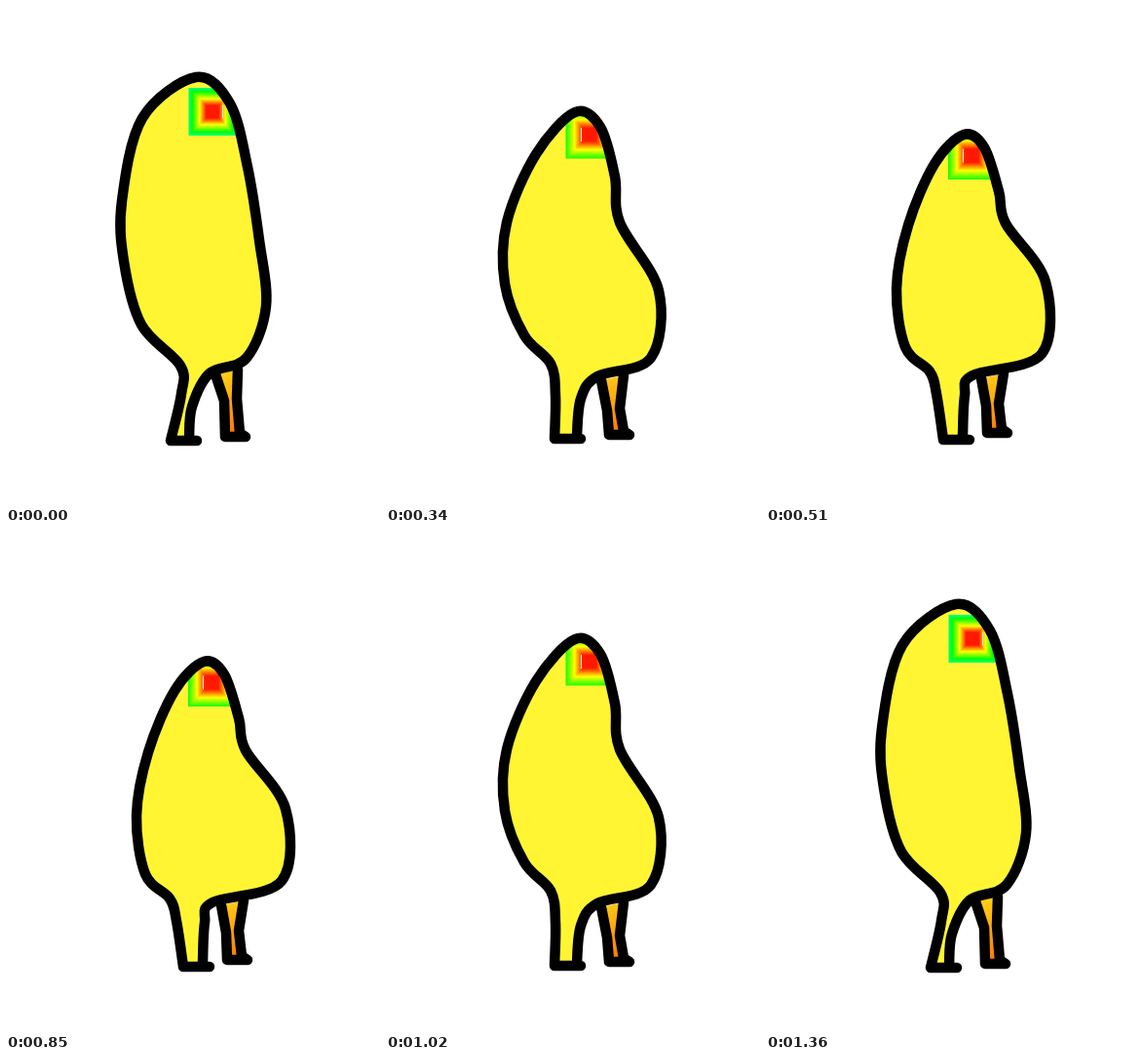
An HTML page with a canvas that plays this animation: 384 px wide and 512 px high, repeating every 1530 ms.

```html
<!DOCTYPE html>
<html lang="en">
<head>
<meta charset="utf-8">
<title>Squashing blob</title>
<style>
  html, body { margin: 0; width: 100%; height: 100%; overflow: hidden; background: #fff; }
  canvas { display: block; width: 100vw; height: 100vh; }
</style>
</head>
<body>
<canvas id="stage" width="384" height="512"></canvas>
<script>
const ctx = document.getElementById('stage').getContext('2d');
const STEP = 170, STEPS = 9;

// body: key points from the front heel, clockwise over the crown, to the front ankle
// leg: top, knee and heel of the back leg
// face: centre x, centre y, hue at the rim, side of the pale seam
const tall = {
  body: [[169, 446], [180, 398], [179, 369], [139, 327], [121, 262], [119, 200], [140, 115], [195, 73],
    [230, 100], [248, 165], [260, 240], [267, 308], [247, 361], [209, 377], [191, 411], [188, 443]],
  leg: [[215, 378], [224, 405], [225, 442]],
  face: [212, 108.5, 150, 1]
};
const bent = {
  body: [[173, 444], [174, 400], [169, 367], [142, 338], [122, 285], [124, 222], [154, 152], [194, 109],
    [220, 124], [235, 175], [240, 222], [280, 292], [272, 361], [217, 380], [200, 403], [196, 440]],
  leg: [[221, 384], [227, 415], [229, 440]],
  face: [209, 132, 115, -1]
};
const low = {
  body: [[182, 445], [175, 398], [168, 375], [143, 350], [134, 290], [146, 225], [173, 162], [203, 132],
    [224, 145], [239, 190], [246, 223], [287, 283], [283, 357], [212, 379], [204, 400], [202, 440]],
  leg: [[221, 382], [226, 410], [227, 438]],
  face: [211.5, 153.5, 115, -1]
};

function mix(a, b, t) {
  if (Array.isArray(a)) return a.map((v, i) => mix(v, b[i], t));
  return a + (b - a) * t;
}

function mixPose(a, b, t) {
  const part = name => mix(a[name], b[name], t);
  return { body: part('body'), leg: part('leg'), face: part('face') };
}

const poses = [tall, mixPose(tall, bent, 0.55), bent, low, mixPose(bent, low, 1.35)];

// Foot sole, then a Catmull-Rom curve through the key points.
function bodyOutline(points) {
  const path = new Path2D();
  const at = i => points[Math.max(0, Math.min(points.length - 1, i))];
  const handle = (i, side) => at(i).map((v, k) => v + side * (at(i + 1)[k] - at(i - 1)[k]) / 6);
  const [heelX, heelY] = points[0];
  path.moveTo(heelX + 27, heelY);
  path.lineTo(heelX, heelY);
  for (let i = 1; i < points.length; i++) {
    path.bezierCurveTo(...handle(i - 1, 1), ...handle(i, -1), ...at(i));
  }
  return path;
}

// The shin side mirrors the calf side at the leg's width, with a sole at the heel.
function legOutline([top, knee, heel]) {
  const path = new Path2D();
  const add = ([x, y], dx = 0, dy = 0) => path.lineTo(x + dx, y + dy);
  add(top);
  add(knee);
  add(heel);
  add(heel, 21);
  add(heel, 15, -4);
  add(knee, 13, -2);
  add(top, 23, -5);
  return path;
}

function drawFace([x, y, rimHue, seam]) {
  const core = 6, rim = 24.5;
  for (let d = rim; d > core; d -= 0.5) {
    ctx.fillStyle = `hsl(${Math.max(6, rimHue * (d - core) / (rim - core))} 100% 50%)`;
    ctx.fillRect(x - d, y - d, 2 * d, 2 * d);
  }
  ctx.fillStyle = '#ffe8d8';
  ctx.fillRect(Math.round(x + 9.5 * Math.sign(seam)), y - 7, 1, 14);
}

function drawPose({ body, leg, face }) {
  ctx.fillStyle = '#fff';
  ctx.fillRect(0, 0, 384, 512);
  ctx.lineWidth = 10.5;
  ctx.lineCap = ctx.lineJoin = 'round';

  const legPath = legOutline(leg);
  const orange = ctx.createLinearGradient(222, 380, 240, 435);
  orange.addColorStop(0, '#ffcc18');
  orange.addColorStop(1, '#ff7c00');
  ctx.fillStyle = orange;
  ctx.fill(legPath);
  ctx.stroke(legPath);

  const bodyPath = bodyOutline(body);
  ctx.fillStyle = '#fff533';
  ctx.fill(bodyPath);
  ctx.save();
  ctx.clip(bodyPath);
  drawFace(face);
  ctx.restore();
  ctx.stroke(bodyPath);
}

function frame() {
  const step = Math.floor(performance.now() / STEP) % STEPS;
  drawPose(poses[4 - Math.abs(4 - step)]);
  requestAnimationFrame(frame);
}
frame();
</script>
</body>
</html>
```
